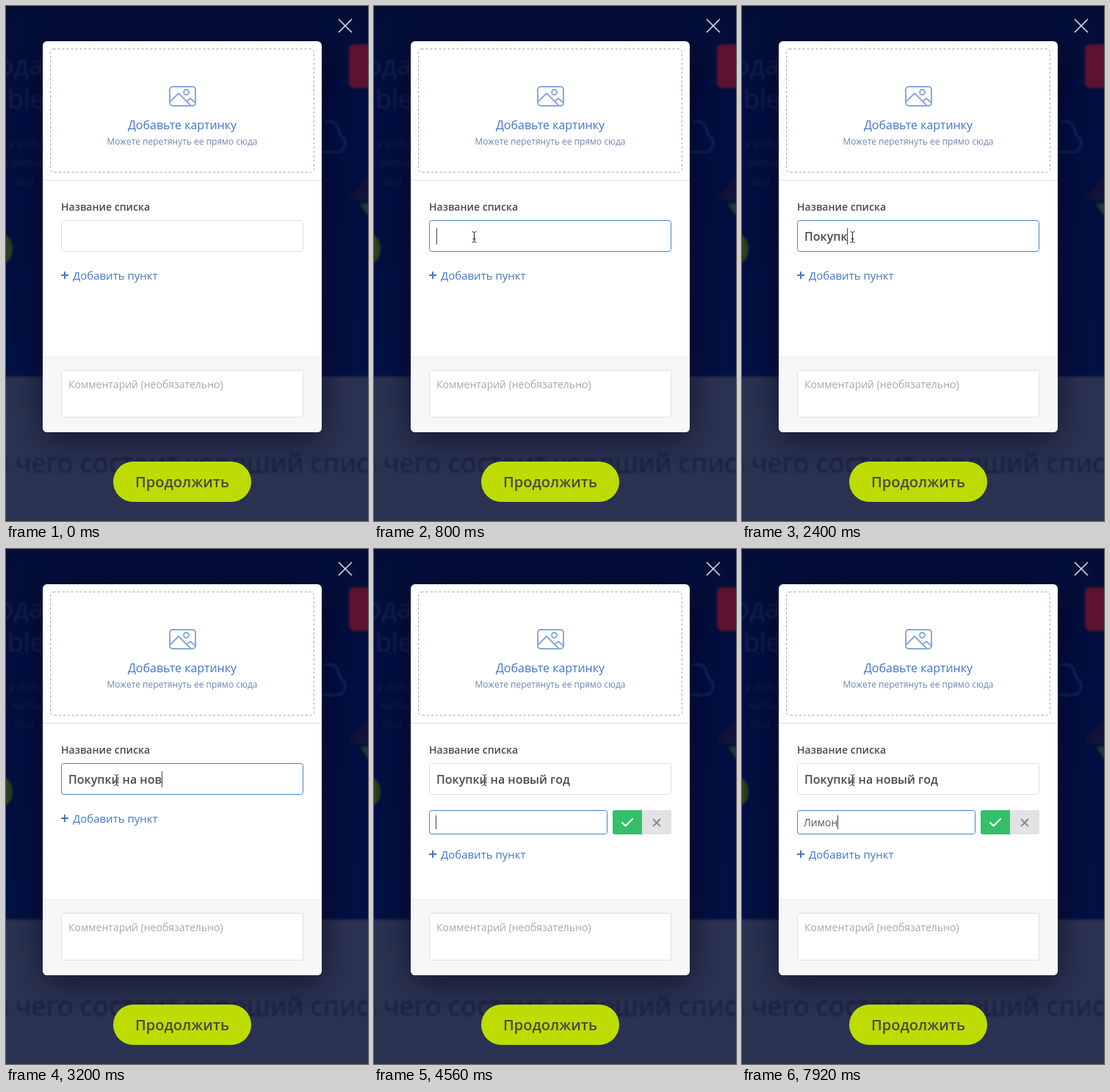
An HTML page with a canvas for the animation above (8000 ms loop, 493 by 702 pixels).

```html
<!DOCTYPE html>
<html lang="ru">
<head>
<meta charset="utf-8">
<title>Новый список</title>
<style>
html, body { margin: 0; width: 100%; height: 100%; overflow: hidden; background: #030d3c; }
canvas { display: block; }
</style>
</head>
<body>
<canvas id="stage" width="493" height="702"></canvas>
<script>
const W = 493, H = 702, LOOP = 8000, STEP = 80;
const ctx = document.getElementById('stage').getContext('2d');
const FONT = '"Open Sans", "Noto Sans", sans-serif';
const BLUE = '#4277c5', INK = '#4a4a4a', GREY = [222, 222, 222], FOCUS = [74, 127, 208];

const TITLE = 'Покупки на новый год';
const TITLE_TIMES = [1600, 1760, 1920, 2000, 2240, 2400, 2480, 2640, 2720, 2800,
  2880, 2960, 3120, 3200, 3280, 3440, 3680, 3760, 3920, 4000];
const ITEM = 'Лимон';
const ITEM_TIMES = [7360, 7520, 7680, 7760, 7920];
const FOCUS_AT = 720, ADD_AT = 4400;

const clamp = v => Math.max(0, Math.min(1, v));
const ramp = (t, from, to) => clamp((t - from) / (to - from));
const mix = (a, b, k) => a + (b - a) * k;
const blend = (a, b, k) => `rgb(${a.map((v, i) => Math.round(mix(v, b[i], k))).join()})`;
const typed = (text, times, t) => text.slice(0, times.filter(at => at <= t).length);

function label(c, text, x, y, font, color, align = 'left') {
  c.font = `${font} ${FONT}`;
  c.fillStyle = color;
  c.textAlign = align;
  c.fillText(text, x, y);
}

function box(c, x, y, w, h, r, fill, stroke, width = 1) {
  c.beginPath();
  c.roundRect(x, y, w, h, r);
  if (fill) { c.fillStyle = fill; c.fill(); }
  if (stroke) { c.strokeStyle = stroke; c.lineWidth = width; c.stroke(); }
}

function line(c, points, color, width) {
  c.beginPath();
  points.forEach(([x, y]) => c.lineTo(x, y));
  c.strokeStyle = color;
  c.lineWidth = width;
  c.stroke();
}

function disc(c, x, y, r, fill) {
  c.beginPath();
  c.arc(x, y, r, 0, 7);
  c.fillStyle = fill;
  c.fill();
}

function cross(c, x, y, r, color, width) {
  line(c, [[x - r, y - r], [x + r, y + r]], color, width);
  line(c, [[x + r, y - r], [x - r, y + r]], color, width);
}

function drawPage(c) {
  const sky = c.createLinearGradient(0, 0, 0, 505);
  sky.addColorStop(0, '#030d36');
  sky.addColorStop(.3, '#020c40');
  sky.addColorStop(1, '#030f42');
  c.fillStyle = sky;
  c.fillRect(0, 0, W, H);

  c.filter = 'blur(1.5px)';
  c.fillStyle = '#2a3251';
  c.fillRect(-9, 505, W + 18, H);
  label(c, 'года', 51, 94, '36px', '#18224f', 'right');
  label(c, 'mble', 53, 140, '36px', '#18224f', 'right');
  ['у году', 'я любы', 'дки –'].forEach((text, i) =>
    label(c, text, 50, 193 + i * 26, 'italic 600 16px', '#111b4a', 'right'));
  label(c, 'Из чего состоит хороший список', W / 2, 636, '36px', '#171e3d', 'center');
  disc(c, -16, 331, 25, '#29411f');
  box(c, 467, 52, 40, 60, 8, '#5c1230');
  c.beginPath();
  c.arc(440, 170, 13, 4.2, 6.1);
  c.arc(450, 187, 12, 5.2, 8);
  c.lineTo(425, 199);
  c.strokeStyle = '#12295f';
  c.lineWidth = 3;
  c.stroke();
  c.beginPath();
  c.moveTo(466, 262);
  c.lineTo(500, 225);
  c.lineTo(500, 272);
  c.fillStyle = '#121238';
  c.fill();
  c.beginPath();
  c.moveTo(482, 270);
  c.lineTo(500, 268);
  c.lineTo(500, 296);
  c.fillStyle = '#1d3a34';
  c.fill();
  c.filter = 'none';
}

function drawModal(c) {
  c.save();
  c.shadowColor = 'rgba(0,4,20,.6)';
  c.shadowBlur = 50;
  c.shadowOffsetY = 10;
  box(c, 50, 48, 380, 533, 6, '#fff');
  c.restore();

  box(c, 50, 479, 380, 102, [0, 0, 6, 6], '#f7f7f7');
  c.fillStyle = '#e9e9e9';
  c.fillRect(50, 478, 380, 1);
  c.fillStyle = '#dcdde0';
  c.fillRect(50, 237, 380, 1);

  c.setLineDash([3, 3]);
  box(c, 60.5, 58.5, 359, 168, 4, null, '#93a5d4');
  c.setLineDash([]);

  const icon = '#8aa8da';
  c.lineJoin = c.lineCap = 'round';
  box(c, 223, 110, 35, 26, 4, null, icon, 2);
  line(c, [[224, 130], [235, 119], [251, 135]], icon, 2);
  line(c, [[246, 130], [251, 126], [258, 132]], icon, 2);
  c.beginPath();
  c.arc(245.5, 117.5, 3.5, 0, 7);
  c.stroke();
  c.lineJoin = 'miter';
  c.lineCap = 'butt';

  label(c, 'Добавьте картинку', 240, 168, '16px', BLUE, 'center');
  label(c, 'Можете перетянуть ее прямо сюда', 240, 189, '12px', '#6c86b4', 'center');
  label(c, 'Название списка', 75, 279, '600 14px', INK);
  box(c, 75.5, 496.5, 329, 64, 3, '#fff', '#dedede');
  label(c, 'Комментарий (необязательно)', 85, 521, '14px', '#a8a8a8');

  box(c, 146, 621, 188, 55, 27.5, '#bddc04');
  label(c, 'Продолжить', 240, 656, '600 20px', '#474a3b', 'center');
  cross(c, 462, 27, 9, '#d3d5de', 1.7);
}

const backdrop = document.createElement('canvas');
function buildBackdrop() {
  backdrop.width = W;
  backdrop.height = H;
  const c = backdrop.getContext('2d');
  drawPage(c);
  drawModal(c);
}

function drawEntry(text, x, y, font, color, caretOn, top, height) {
  label(ctx, text, x, y, font, color);
  if (!caretOn) return;
  ctx.fillStyle = '#444';
  ctx.fillRect(Math.floor(x + ctx.measureText(text).width), top, 1, height);
}

function drawTitleField(t) {
  const focus = ramp(t, 640, 800) * (1 - ramp(t, 4320, 4560));
  box(ctx, 75.5, 292.5, 329, 42, 3, '#fff', blend(GREY, FOCUS, focus));
  const caretOn = t >= FOCUS_AT && t < ADD_AT && !(t >= 1120 && t < TITLE_TIMES[0]);
  drawEntry(typed(TITLE, TITLE_TIMES, t), 85, 320, '600 16px', INK, caretOn, 303, 22);
}

function drawItemRow(t) {
  box(ctx, 75.5, 356.5, 242, 32, 3, '#fff', blend(GREY, FOCUS, ramp(t, 4320, 4560)));
  box(ctx, 325, 356, 40, 33, [3, 0, 0, 3], '#33c06b');
  box(ctx, 365, 356, 40, 33, [0, 3, 3, 0], '#e2e2e2');
  line(ctx, [[337.5, 372.5], [342.5, 377.5], [352.5, 367.5]], '#fff', 2);
  cross(ctx, 385, 373, 5, '#898989', 2);
  const caretOn = t >= ITEM_TIMES[0] || Math.floor((t - ADD_AT) / 480) % 2 === 0;
  drawEntry(typed(ITEM, ITEM_TIMES, t), 84, 378, '14px', '#555', caretOn, 363, 19);
}

function drawAddLink(dy) {
  ctx.fillStyle = BLUE;
  ctx.fillRect(75, 366 + dy, 10, 2);
  ctx.fillRect(79, 362 + dy, 2, 10);
  label(ctx, 'Добавить пункт', 91, 373 + dy, '15px', BLUE);
}

function beamCursor(x, y) {
  const stroke = (color, width) => {
    line(ctx, [[x - 3, y - 7.5], [x - 1, y - 7], [x, y - 6], [x, y + 6], [x - 1, y + 7], [x - 3, y + 7.5]], color, width);
    line(ctx, [[x + 3, y - 7.5], [x + 1, y - 7], [x, y - 6]], color, width);
    line(ctx, [[x + 3, y + 7.5], [x + 1, y + 7], [x, y + 6]], color, width);
    line(ctx, [[x - 2, y + 2.5], [x + 2, y + 2.5]], color, width);
  };
  stroke('rgba(255,255,255,.8)', 2.5);
  stroke('#222', 1);
}

function arrowCursor(x, y) {
  const shape = [[0, 0], [0, 15], [3.5, 12], [6, 17.5], [8.5, 16.5], [6, 11], [11, 11]];
  ctx.beginPath();
  shape.forEach(([dx, dy]) => ctx.lineTo(x + dx, y + dy));
  ctx.closePath();
  ctx.fillStyle = '#000';
  ctx.fill();
  ctx.strokeStyle = '#fff';
  ctx.lineWidth = 1;
  ctx.stroke();
}

function drawCursor(t) {
  if (t < 80) return;
  const rise = 1 - (1 - ramp(t, 80, 560)) ** 2;
  const x = mix(274, 136.5, rise) + 14 * ramp(t, 800, 960);
  const y = mix(690, 322, rise) - 7 * ramp(t, 640, 800);
  (y > 292 && y < 335 ? beamCursor : arrowCursor)(x, y);
}

function draw(t) {
  ctx.drawImage(backdrop, 0, 0);
  drawTitleField(t);
  const adding = t >= ADD_AT;
  if (adding) drawItemRow(t);
  drawAddLink(adding ? 49 : 0);
  drawCursor(t);
}

buildBackdrop();
const start = performance.now();
function tick() {
  const t = (performance.now() - start) % LOOP;
  draw(Math.floor(t / STEP) * STEP);
  requestAnimationFrame(tick);
}
tick();
</script>
</body>
</html>
```
